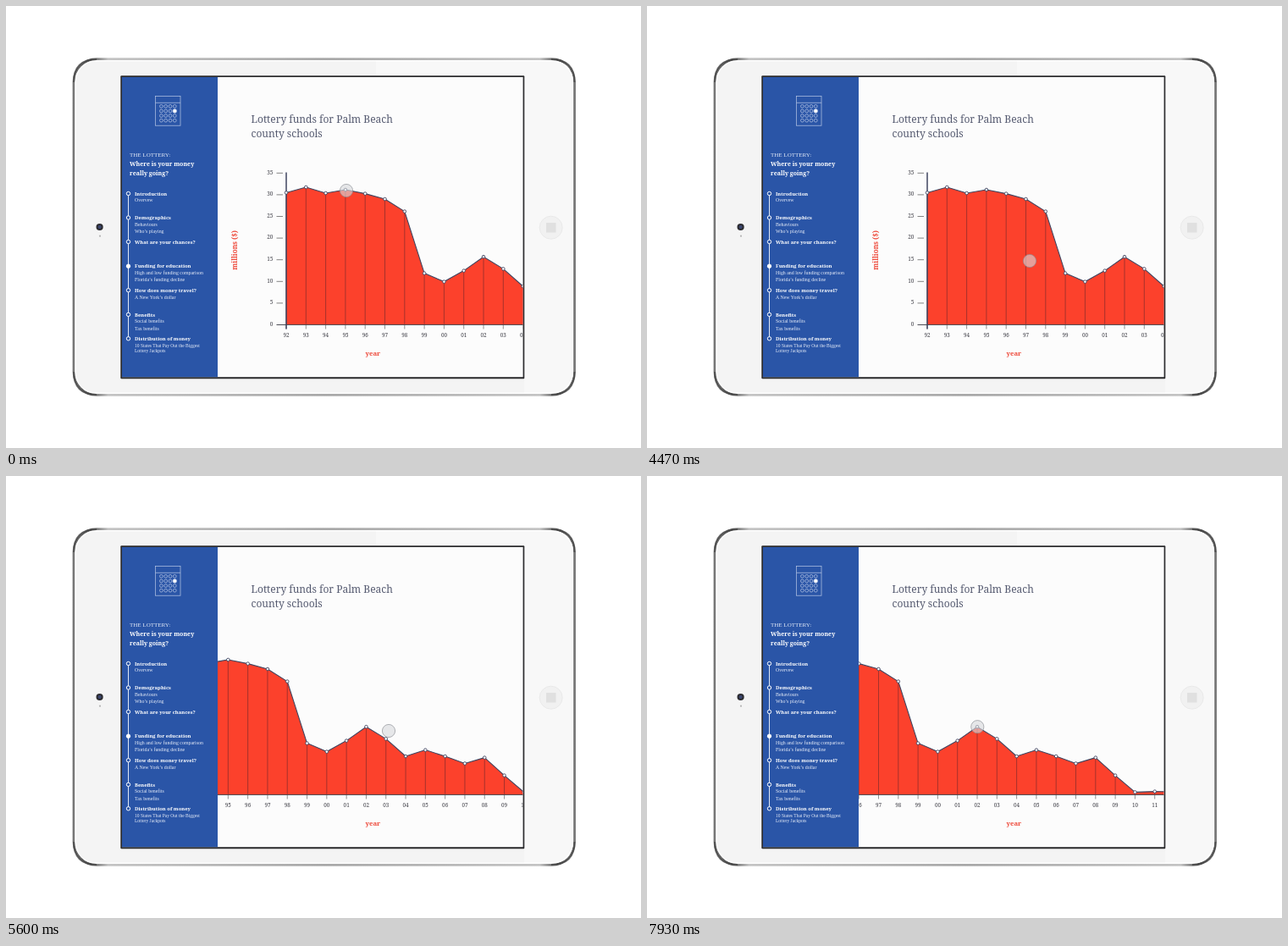
An HTML page that plays this animation: 750 px wide and 522 px high, repeating every 8000 ms.

```html
<!DOCTYPE html>
<html lang="en">
<head>
<meta charset="utf-8">
<title>Lottery funds chart</title>
<style>
  html, body { margin: 0; width: 100%; height: 100%; overflow: hidden; background: #fff; }
  svg { display: block; width: 100%; height: 100%; }
  .slab { font-family: "Noto Serif", serif; }
  .book { font-family: "Liberation Serif", serif; }
</style>
</head>
<body>
<svg id="stage" viewBox="0 0 750 522">
  <defs>
    <clipPath id="screen"><rect x="250" y="84" width="360.5" height="354"/></clipPath>
    <linearGradient id="edge" x1="79" x2="672" y1="0" y2="0" gradientUnits="userSpaceOnUse">
      <stop offset="0" stop-color="#777"/>
      <stop offset=".035" stop-color="#555"/>
      <stop offset=".07" stop-color="#c4c4c4"/>
      <stop offset=".5" stop-color="#a8a8a8"/>
      <stop offset=".93" stop-color="#c4c4c4"/>
      <stop offset=".965" stop-color="#555"/>
      <stop offset="1" stop-color="#777"/>
    </linearGradient>
  </defs>
  <g id="tablet"></g>
  <g id="page" clip-path="url(#screen)">
    <g id="chart"></g>
    <g id="labels"></g>
    <g id="popup"></g>
    <circle id="cursor" r="7.6" fill="#d9dadd" fill-opacity=".62" stroke="#8d8f96" stroke-opacity=".75" stroke-width=".9"/>
  </g>
  <g id="side"></g>
</svg>
<script>
const NS = 'http://www.w3.org/2000/svg';
const LOOP = 8000;
const RED = '#fc412c', INK = '#3f4560', NAVY = '#27366f', BLUE = '#2a55a7';
const $ = id => document.getElementById(id);

function add(parent, tag, attrs, text) {
  const el = document.createElementNS(NS, tag);
  for (const k in attrs) el.setAttribute(k, attrs[k]);
  if (text !== undefined) el.textContent = text;
  parent.appendChild(el);
  return el;
}
const box = (g, x, y, width, height, more) => add(g, 'rect', { x, y, width, height, ...more });
const dot = (g, cx, cy, r, more) => add(g, 'circle', { cx, cy, r, ...more });
const path = (g, d, more) => add(g, 'path', { d, fill: 'none', ...more });
const type = (g, cls, x, y, size, fill, text, more) =>
  add(g, 'text', { class: cls, x, y, 'font-size': size, fill, ...more }, text);

function drawTablet() {
  const g = $('tablet');
  box(g, 80, 62.7, 591.5, 396.6, { rx: 27, fill: '#f4f4f4', stroke: 'url(#edge)', 'stroke-width': 2.8 });
  path(g, 'M437 65H645Q669 65 669 89V433Q669 457 645 457H612V82H437Z', { fill: '#f8f8f8' });
  box(g, 82, 64.7, 587.5, 392.6, { rx: 25, fill: 'none', stroke: '#fff', 'stroke-width': 1.2 });
  path(g, 'M80 90Q80 63 107 63M644 63Q671.5 63 671.5 90M80 432Q80 459 107 459M644 459Q671.5 459 671.5 432',
    { stroke: '#454545', 'stroke-width': 2, opacity: .75 });
  dot(g, 110.6, 261, 4.1, { fill: '#2b2b30' });
  dot(g, 110.6, 261, 2, { fill: '#3c4672' });
  dot(g, 111, 271.7, 1.1, { fill: '#b4b4b4' });
  dot(g, 643.7, 261.7, 13.5, { fill: '#f1f1f1', stroke: '#e6e6e6', 'stroke-width': .8 });
  box(g, 638, 256, 11.5, 11.5, { fill: '#e0e0e0' });
  box(g, 135.3, 82.2, 477, 358, { rx: 1, fill: '#2c2c2e' });
  box(g, 137, 84, 473.6, 354.2, { fill: '#fcfcfc' });
}

function drawSide() {
  const g = $('side');
  box(g, 137, 84, 113, 354.2, { fill: BLUE });

  const thin = { fill: 'none', stroke: '#b9c8e6', 'stroke-width': .7 };
  box(g, 176.5, 106.5, 29.5, 34.7, thin);
  path(g, 'M176.5 114.3H206', thin);
  for (let i = 0; i < 16; i++) {
    const on = i === 7;
    dot(g, 183.4 + i % 4 * 5.3, 118.4 + (i >> 2) * 5.6, on ? 2.3 : 1.9,
      { ...thin, fill: on ? '#fff' : 'none' });
  }

  type(g, 'book', 146, 178, 7, '#e6ecf8', 'THE LOTTERY:');
  type(g, 'slab', 146, 189, 7.05, '#fff', 'Where is your money', { 'font-weight': 700 });
  type(g, 'slab', 146, 199.6, 7.05, '#fff', 'really going?', { 'font-weight': 700 });

  path(g, 'M144.5 221.5V392.5', { stroke: '#dfe7f5', 'stroke-width': 1 });
  const menu = [
    [221.5, 'Introduction', 'Overvew'],
    [250, 'Demographics', 'Behaviours', 'Who’s playing'],
    [278.5, 'What are your chances?'],
    [307.2, 'Funding for education', 'High and low funding comparison', 'Florida’s funding decline'],
    [335.7, 'How does money travel?', 'A New York’s dollar'],
    [364.4, 'Benefits', 'Social benefits', 'Tax benefits'],
    [392.8, 'Distribution of money', '10 States That Pay Out the Biggest', 'Lottery Jackpots']
  ];
  menu.forEach(([y, head, ...subs], i) => {
    const last = i === 6;
    dot(g, 144.5, y, 2.2, { fill: i === 3 ? '#fff' : BLUE, stroke: '#fff', 'stroke-width': 1 });
    type(g, 'slab', 152, y + 2.1, 5.9, '#fff', head, { 'font-weight': 600 });
    subs.forEach((s, j) =>
      type(g, 'book', 152, y + 9.9 + j * (last ? 6.2 : 8.3), last ? 5.5 : 5.9, '#e9eef9', s));
  });
}

const X0 = 331, STEP = 23.3, BASE = 376.5;
const tops = [220.5, 214, 221, 217, 221.6, 228, 242.6, 315.6, 325.6, 312.6, 296.2,
  310.4, 331, 323.6, 331, 339.5, 332.6, 353.6, 373.4, 372.6, 373];

function drawChart() {
  const g = $('chart');
  const at = tops.map((y, i) => [X0 + i * STEP, y]);
  const end = at[at.length - 1][0];
  const line = 'M' + at.map(p => p.join(' ')).join('L');

  path(g, `${line}V${BASE}H${X0}Z`, { fill: RED });
  for (const [x, y] of at) {
    path(g, `M${x} ${y}V${BASE}`, { stroke: '#7d2a2c', 'stroke-width': .8, opacity: .85 });
    path(g, `M${x} ${BASE}V381.5`, { stroke: '#777', 'stroke-width': .8 });
  }
  path(g, line, { stroke: INK, 'stroke-width': 1.1, 'stroke-linejoin': 'round' });
  path(g, `M319.5 ${BASE}H${end}`, { stroke: '#4d4d55', 'stroke-width': 1 });
  path(g, 'M331 196.5V381.5', { stroke: INK, 'stroke-width': 1.5 });

  at.forEach(([x, y], i) => {
    dot(g, x, y, 1.8, { fill: '#fff', stroke: INK, 'stroke-width': .9 });
    const year = String((92 + i) % 100).padStart(2, '0');
    type(g, 'slab', x, 391.3, 6.3, '#3c3c44', year, { 'text-anchor': 'middle' });
  });
  for (let v = 0; v <= 35; v += 5) {
    const y = BASE - v * 5.12;
    if (v) path(g, `M319.5 ${y}H327`, { stroke: '#777', 'stroke-width': .9 });
    type(g, 'slab', 315.3, y + 1.3, 6.4, '#3c3c44', v, { 'text-anchor': 'end' });
  }
  type(g, 'slab', 0, 0, 8.1, '#ee4a3b', 'millions ($)',
    { 'font-weight': 600, 'text-anchor': 'middle', transform: 'translate(272.6 288.3) rotate(-90)' });
}

function drawLabels() {
  const g = $('labels');
  type(g, 'slab', 289.5, 138.2, 12, '#555a70', 'Lottery funds for Palm Beach', { 'font-weight': 300 });
  type(g, 'slab', 289.5, 155.4, 12, '#555a70', 'county schools', { 'font-weight': 300 });
  type(g, 'slab', 433.3, 413, 7.8, '#ee4a3b', 'year', { 'font-weight': 600, 'text-anchor': 'middle' });
}

function drawPopup() {
  const g = $('popup');
  box(g, 351, 224.2, 99.3, 49.6, { rx: 1.5, fill: '#712018', opacity: .3 });
  box(g, 351, 223.4, 99, 49.6, { rx: 1.5, fill: '#fff' });
  path(g, 'M351 238.5H450M367 254.3H446', { stroke: '#e4e4e8', 'stroke-width': .7 });
  type(g, 'slab', 367, 235.3, 7.2, NAVY, '1995', { 'font-weight': 600 });
  path(g, 'M440 228.2L445.8 234M445.8 228.2L440 234', { stroke: '#44464f', 'stroke-width': .9 });
  type(g, 'slab', 358, 250, 7, NAVY, '$', { 'font-weight': 700 });
  type(g, 'book', 367, 249.4, 5.6, '#4a4c58', 'Funding: $31,009,836');
  dot(g, 360, 259, 2, { fill: 'none', stroke: '#999', 'stroke-width': .7 });
  path(g, 'M359 261V263H361V261', { stroke: '#999', 'stroke-width': .7 });
  type(g, 'book', 367, 262, 5.7, '#4a4c58', '2% increase from 1994');
}

const clamp = v => Math.min(1, Math.max(0, v));
const smooth = p => p * p * (3 - 2 * p);
const glide = p => 1 - (1 - p) ** 3;
const span = (t, a, b) => clamp((t - a) / (b - a));

// Moves as [start, end, x, y]
const moves = [
  [0, 200, 401, 218],
  [2000, 2800, 443, 233],
  [3600, 4300, 452, 301],
  [7000, 7800, 390.3, 296.2]
];

function cursorAt(t) {
  let x = 402, y = 218;
  for (const [a, b, toX, toY] of moves) {
    const p = smooth(span(t, a, b));
    x += (toX - x) * p;
    y += (toY - y) * p;
  }
  return [x, y];
}

function render(t) {
  const shift = -140 * glide(span(t, 4490, 5910)) - 34 * smooth(span(t, 6130, 6930));
  $('chart').setAttribute('transform', `translate(${shift.toFixed(2)} 0)`);

  const shown = smooth(span(t, 700, 900)) * (1 - smooth(span(t, 3330, 3530)));
  $('popup').setAttribute('opacity', shown.toFixed(3));

  const [x, y] = cursorAt(t);
  $('cursor').setAttribute('transform', `translate(${x.toFixed(2)} ${y.toFixed(2)})`);
}

drawTablet();
drawSide();
drawChart();
drawLabels();
drawPopup();

const start = performance.now();
function tick() {
  render((performance.now() - start) % LOOP);
  requestAnimationFrame(tick);
}
tick();
</script>
</body>
</html>
```
